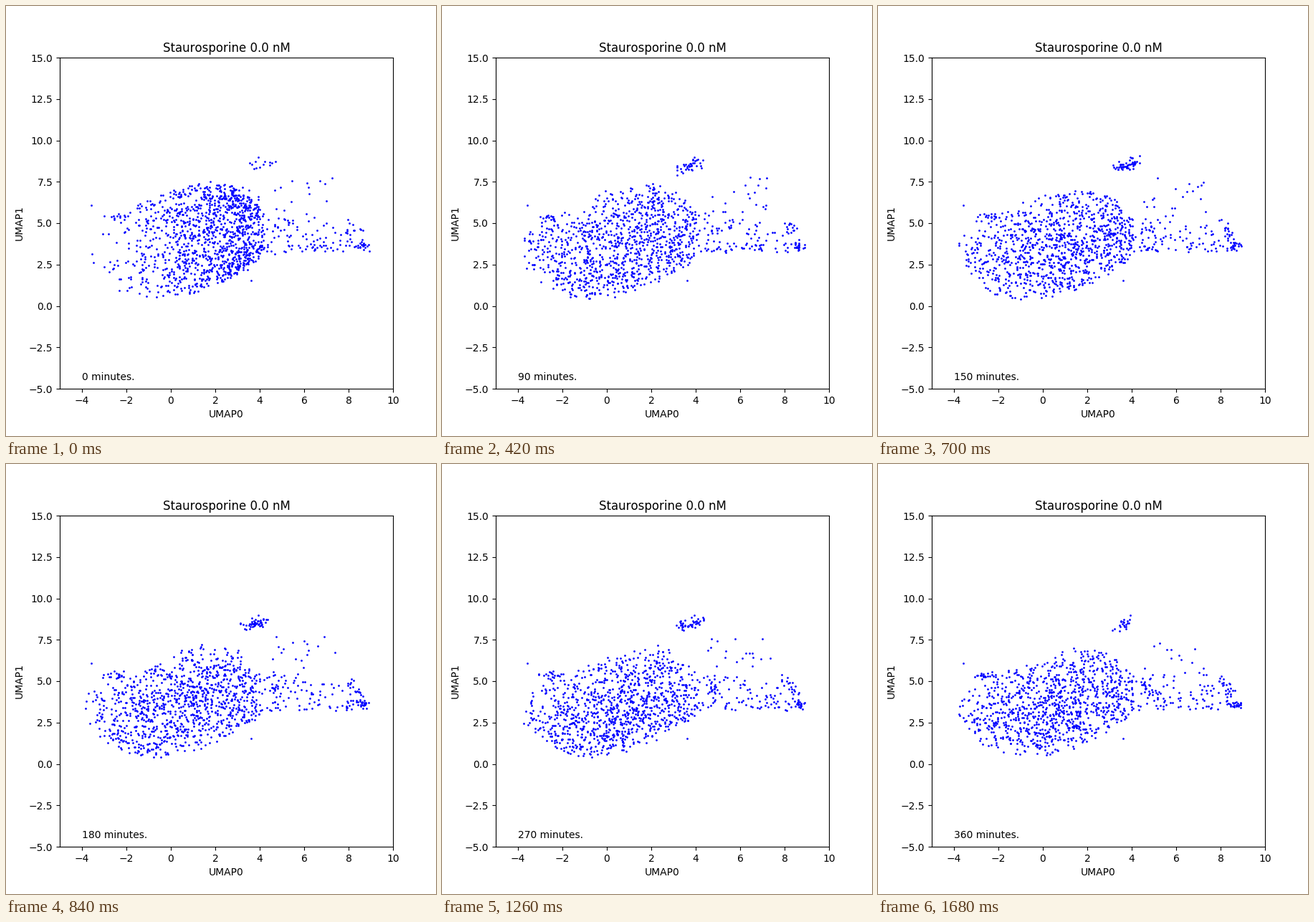
A matplotlib script that plays this animation: 600x600 px, repeating every 1820 ms.

```python
import numpy as np
import matplotlib.pyplot as plt
from matplotlib.animation import FuncAnimation

STEPS, STEP_MS = 13, 140

plt.rcParams["text.kerning_factor"] = 6


def blend(early, late, w):
    return early * w + late * (1 - w)


def cloud(rng, fast, slow):
    """Main body: crowded on the right at first, then spread to the left."""
    n = int(blend(1080, 1030, fast))
    x = -4 + 8.25 * rng.beta(blend(3.1, 2.1, fast), blend(1.5, 1.65, fast), n)
    low = 0.35 + np.where(x < -1, 0.26, 0.1) * (x + 1) ** 2
    left, right = np.clip(2 - x, 0, None), np.clip(x - 2, 0, None)
    high = blend(7.55, 7.25, slow) - 0.22 * left ** 1.5 - 0.42 * right ** 2
    lift = rng.beta(blend(1.15, 1.5, slow), blend(1.1, 1.8, slow), n)
    return np.c_[x, low + (high - low) * lift]


def arm(rng, n=85):
    """Wing to the right that narrows towards its tip."""
    x = rng.uniform(4.3, 8.6, n)
    height = 2.4 - 0.25 * (x - 4.3)
    y = 3.35 + height * rng.random(n) ** 1.6 + rng.normal(0, 0.08, n)
    return np.c_[x, y]


def clump(rng, x, y, sx, sy, slope, n):
    dx, dy = np.clip(rng.normal(size=(2, int(n))), -1.9, 1.9)
    return np.c_[x + sx * dx, y + sy * dy + slope * sx * dx]


def strays(rng, n=20):
    fixed = [(3.95, 9.0), (8.9, 3.7), (3.6, 1.55), (-3.57, 6.07)]
    loose = np.c_[rng.uniform(4.5, 7.4, n), rng.uniform(5, 7.8, n)]
    return np.r_[fixed, loose]


def cells(t):
    rng = np.random.default_rng(40 + t)
    fast, slow = np.exp(-t / 1.2), np.exp(-t / 5)
    swell = np.sin(np.pi * t / STEPS)
    return np.concatenate([
        cloud(rng, fast, slow),
        arm(rng),
        strays(rng),
        # Island above the cloud grows and shrinks again
        clump(rng, blend(4.1, 3.75, fast), 8.5, 0.32, 0.18, 0.4, 12 + 36 * swell),
        # Knots along the edges fill up slowly
        clump(rng, -2.5, 5.35, 0.3, 0.13, 0.1, 24 - 16 * slow),
        clump(rng, 4.75, 4.65, 0.16, 0.2, 0, 17 - 14 * slow),
        clump(rng, 8.25, 4.6, 0.2, 0.25, -1.2, 20 - 12 * slow),
        clump(rng, 8.65, 3.6, 0.15, 0.13, -0.2, 18),
        # Early crowding that dissolves to the left
        clump(rng, 2.8 - 0.9 * t, 6.4, 0.6, 0.45, -0.2, 70 * fast),
        clump(rng, 3 - 0.3 * t, 2.7, 0.35, 0.35, 0.3, 50 * fast),
    ])


fig, ax = plt.subplots(figsize=(6, 6), dpi=100)
ax.set(xlim=(-5, 10), ylim=(-5, 15), xlabel="UMAP0", ylabel="UMAP1",
       title="Staurosporine 0.0 nM")
dots, = ax.plot([], [], "bo", markersize=1)
clock = ax.text(-4, -4.5, "")


def update(t):
    dots.set_data(*cells(t).T)
    clock.set_text(f"{30 * t} minutes.")
    return dots, clock


anim = FuncAnimation(fig, update, frames=STEPS, interval=STEP_MS, repeat=True)
plt.show()
```
